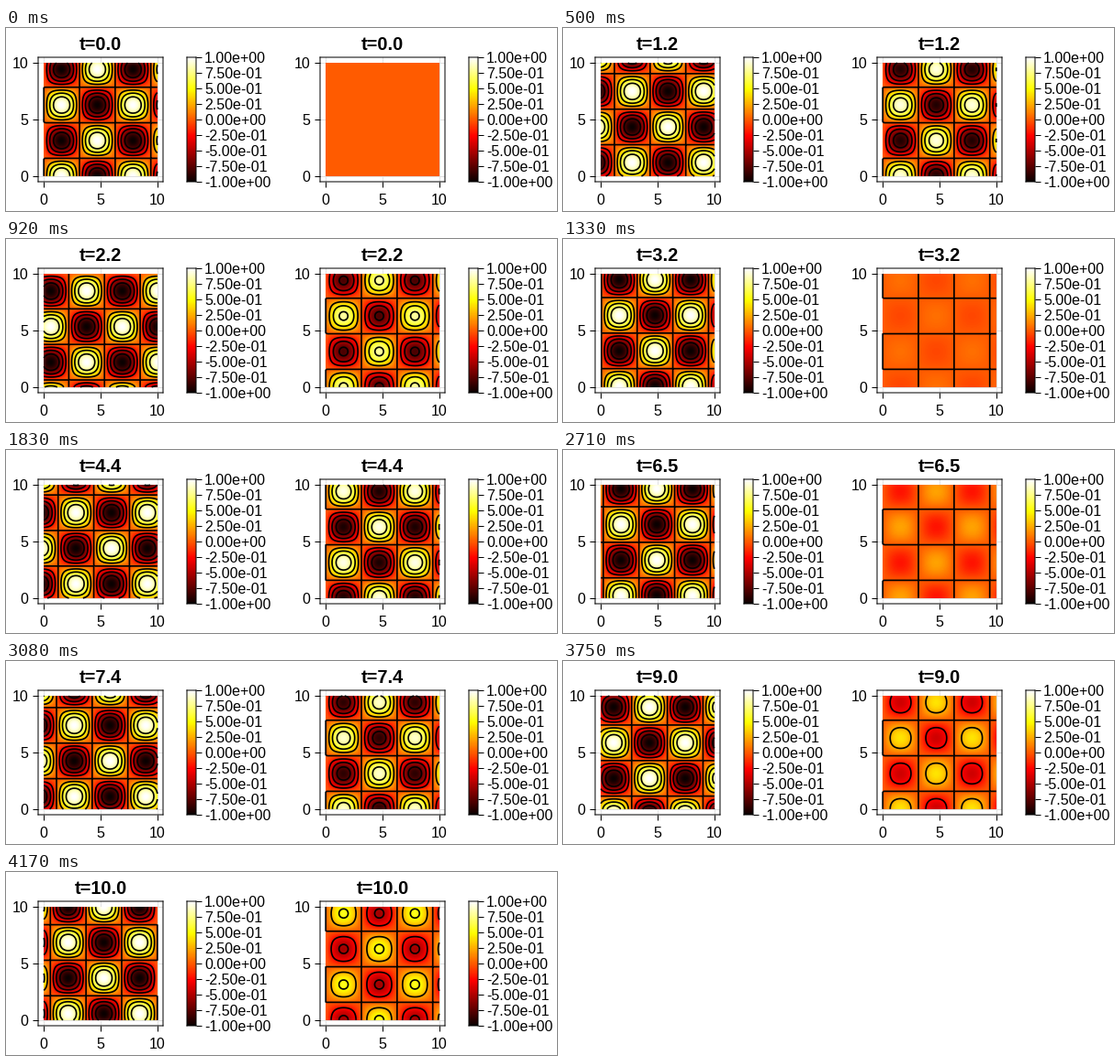
A matplotlib script that plays this animation: 600 by 200 pixels, repeating every 4.21 s.

```python
import numpy as np
import matplotlib.pyplot as plt
from matplotlib.animation import FuncAnimation
from matplotlib.collections import LineCollection

W, H, DPI = 600, 200, 100
STEPS, LOOP_MS = 101, 4210
SUB = 3  # drawn frames per time step
TOP, SIDE = 32, 136
LEVELS = np.linspace(-0.75, 0.75, 7)
PX = 72 / DPI  # points per pixel

plt.rcParams.update({
    "font.family": "Liberation Sans",
    "font.size": 16 * PX,
    "axes.linewidth": PX,
    "grid.linewidth": PX,
})

times = np.arange(STEPS) / 10
grid = np.linspace(0, 10, 101)
fine = (np.arange(248) + 0.5) * 10 / 248


def travelling(x, y, t):
    return np.sin(x - t) * np.cos(y - t)


def standing(x, y, t):
    return np.sin(x) * np.cos(y) * np.sin(t)


def sample(func, axis, t):
    return func(axis[None, :], axis[:, None], t)


def add_box(left, width):
    return fig.add_axes([left / W, 1 - (TOP + SIDE) / H, width / W, SIDE / H])


def style_ticks(ax, axis, pad):
    ax.tick_params(axis=axis, length=6 * PX, width=PX, pad=pad * PX)


def soften(ax):
    """Antialias the frame and ticks instead of snapping them to pixels."""
    for line in [*ax.spines.values(), *ax.get_xticklines(), *ax.get_yticklines()]:
        line.set_snap(False)


class Panel:
    def __init__(self, left, func):
        self.func = func
        self.ax = ax = add_box(left, SIDE)
        self.image = ax.imshow(sample(func, fine, 0), cmap="hot", vmin=-1, vmax=1,
                               extent=(0, 10, 0, 10), origin="lower",
                               interpolation="bilinear", aspect="auto", zorder=1)
        ax.set(xlim=(-0.5, 10.5), ylim=(-0.5, 10.5),
               xticks=(0, 5, 10), yticks=(0, 5, 10))
        ax.set_axisbelow(True)
        ax.grid(color="0.88")
        style_ticks(ax, "x", 7)
        style_ticks(ax, "y", 4.5)
        for label in ax.get_yticklabels():
            label.set_va("center_baseline")
        soften(ax)

        self.curves = [self.contour_curves(t) for t in times]
        self.lines = LineCollection([], colors="black", linewidths=1.7 * PX, zorder=2)
        self.lines.set_snap(False)
        ax.add_collection(self.lines, autolim=False)

        self.title = fig.text((left + SIDE / 2) / W, 1 - 24 / H, "", ha="center",
                              va="baseline", size=20 * PX, weight="bold")
        self.add_colorbar(left + 162)

    def add_colorbar(self, left):
        bar = add_box(left, 10)
        bar.imshow(np.linspace(-1, 1, 256)[:, None], cmap="hot", origin="lower",
                   extent=(0, 1, -1, 1), aspect="auto")
        values = np.linspace(-1, 1, 9)
        bar.set_xticks([])
        bar.set_yticks(values, [f"{v:.2e}" for v in values], va="center_baseline")
        bar.yaxis.tick_right()
        style_ticks(bar, "y", 3)
        soften(bar)

    def contour_curves(self, t):
        z = sample(self.func, grid, t)
        if np.ptp(z) == 0:
            return []
        contours = self.ax.contour(grid, grid, z, levels=LEVELS)
        curves = [c for level in contours.allsegs for c in level if len(c) > 1]
        contours.remove()
        return curves

    def update(self, step):
        t = times[step]
        self.image.set_data(sample(self.func, fine, t))
        self.lines.set_segments(self.curves[step])
        self.title.set_text(f"t={t:.1f}")


fig = plt.figure(figsize=(W / DPI, H / DPI), dpi=DPI, facecolor="white")
panels = [Panel(35, travelling), Panel(342, standing)]


def draw(i):
    step = min((i + 1) // SUB, STEPS - 1)
    for panel in panels:
        panel.update(step)
    return []


anim = FuncAnimation(fig, draw, frames=STEPS * SUB, interval=LOOP_MS / (STEPS * SUB),
                     repeat=True, repeat_delay=0)
plt.show()
```
